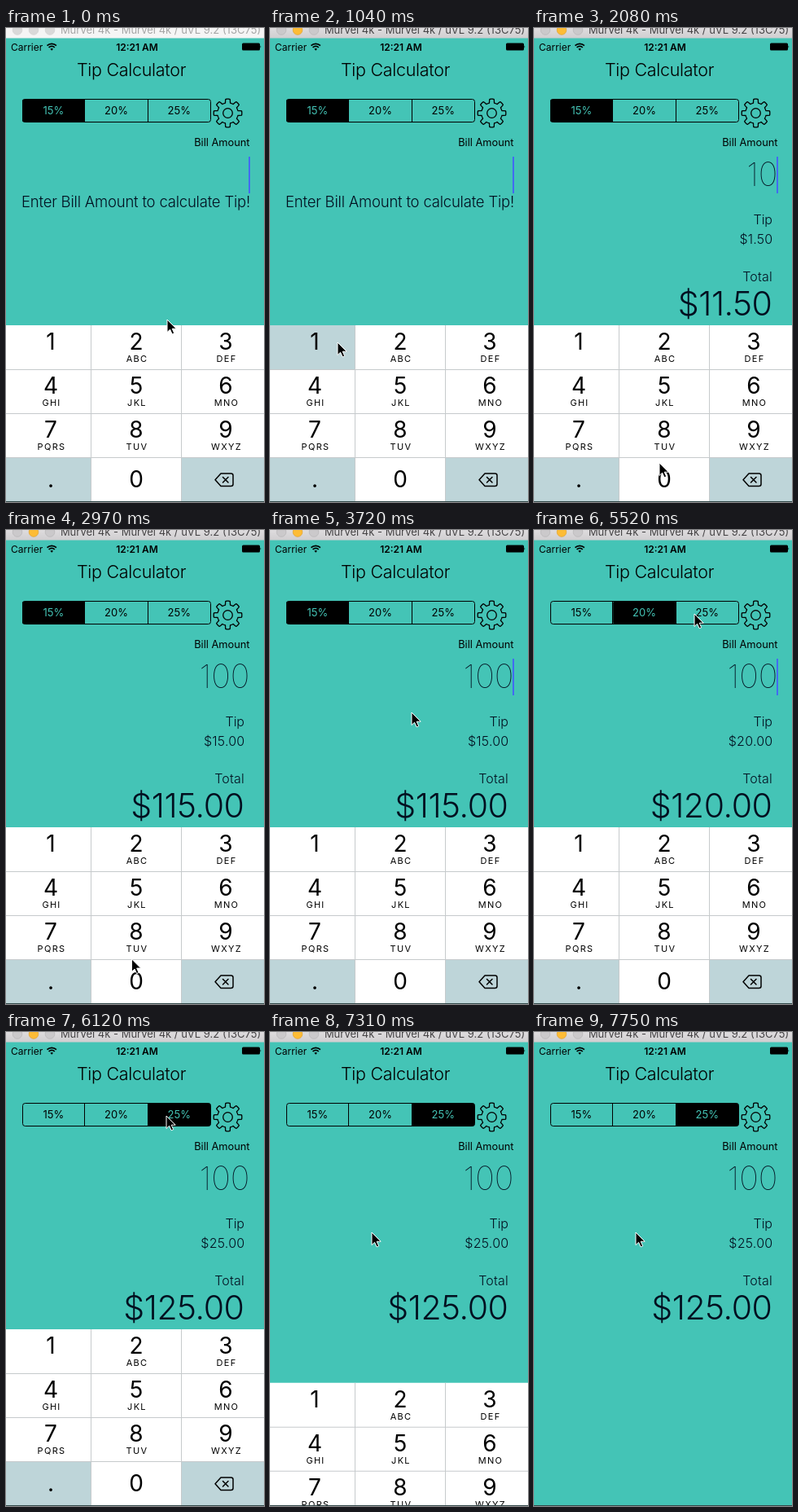
Animation, 317 px wide and 582 px high, one loop 8000 ms. Source, as an HTML page:

```html
<!DOCTYPE html>
<html lang="en">
<head>
<meta charset="utf-8">
<title>Tip Calculator</title>
<style>
  html, body { margin: 0; width: 100%; height: 100%; overflow: hidden; background: #44c4b6; }
  svg { display: block; width: 100%; height: 100%; }
  text { font-family: Inter, "Open Sans", sans-serif; font-size: 13px; font-optical-sizing: none; }
  .mid { text-anchor: middle; }
  .end { text-anchor: end; }
  .light { font-weight: 300; fill: #021020; font-size: 16px; }
  .line { fill: none; stroke: #000; }
  .letters { font-size: 11px; letter-spacing: 1.3px; }
  .digit { font-size: 28px; }
  .bar { fill: #f5f5f5; }
  .light-dot { fill: #d9d9d9; stroke: #cecece; stroke-width: .7; }
  .caption { fill: #a6a6a6; }
  .active .bar { fill: url(#barShade); }
  .active .light-dot { fill: #cbc9cb; stroke: #b5b3b5; }
  .active .amber { fill: #fdbc36; stroke: #e0a02c; }
  .active .caption { fill: #464446; }
</style>
</head>
<body>
<svg viewBox="0 0 317 582">
  <defs>
    <linearGradient id="barShade" x2="0" y2="1">
      <stop offset="0" stop-color="#dedcde"/><stop offset="1" stop-color="#d0ced0"/>
    </linearGradient>
  </defs>
  <rect width="317" height="582" fill="#44c4b6"/>

  <g id="window">
    <rect class="bar" width="317" height="12.5"/>
    <circle class="light-dot" cx="14" cy="2.5" r="5.8"/>
    <circle class="light-dot amber" cx="34" cy="2.5" r="5.8"/>
    <circle class="light-dot" cx="54" cy="2.5" r="5.8"/>
    <text class="caption mid" x="190" y="7">Murvel 4k - Murvel 4k / uVL 9.2 (13C75)</text>
  </g>

  <text x="6" y="27.5" style="font-size:12px">Carrier</text>
  <path class="line" stroke-width="1.7" d="M50.5 21.7a8 8 0 0 1 11.4 0M52.6 24a5 5 0 0 1 7.2 0"/>
  <path d="M56.2 27.800l-1.800-2q1.800-1.400 3.600 0z"/>
  <text class="mid" x="161" y="27.5" style="font-size:12px;font-weight:600">12:21 AM</text>
  <rect x="290" y="18.5" width="22" height="9" rx="1.5"/>
  <path d="M312.500 21.200q1.600 1.800 0 3.600z"/>

  <text class="mid" x="154" y="59" style="font-size:21.5px;font-weight:300;letter-spacing:-.3px">Tip Calculator</text>
  <g id="segments"></g>
  <rect class="line" x="20.5" y="87.5" width="231" height="28" rx="3"/>
  <path class="line" d="M96.500 88v27M174.500 88v27"/>
  <path id="gear" class="line" stroke-width="1.3"/>
  <circle class="line" cx="272.5" cy="104.5" r="5.8" stroke-width="1.3"/>

  <text class="end" x="299.5" y="145" style="font-size:12.8px">Bill Amount</text>
  <text id="bill" class="end" x="299.5" y="194" style="font-size:40px;font-weight:100;fill:#021020"></text>
  <rect id="caret" x="298" y="158" width="2" height="45" fill="#426bf2"/>
  <text id="prompt" class="light mid" x="159.5" y="220" style="font-size:18.5px;letter-spacing:-.2px">Enter Bill Amount to calculate Tip!</text>
  <g id="results" class="end">
    <text class="light" x="293" y="241">Tip</text>
    <text id="tip" class="light" x="293.5" y="265" style="letter-spacing:.25px"></text>
    <text class="light" x="293" y="311" style="letter-spacing:.2px">Total</text>
    <text id="total" class="light" x="292.5" y="353" style="font-size:41px;letter-spacing:-.4px"></text>
  </g>

  <g id="keypad">
    <rect y="365" width="317" height="217" fill="#fff"/>
    <path d="M0 527.500h104.500V582H0zM215.500 527.500H317V582H215.500z" fill="#bed5d9"/>
    <rect id="pressed" height="54" fill="#bed5d9"/>
    <path class="line" style="stroke:#c6cacc" d="M0 419.500H317M0 473.500H317M0 527.500H317M104.500 365V582M215.500 365V582"/>
    <g id="keys"></g>
    <path class="line" stroke-width="1.5" stroke-linejoin="round" stroke-linecap="round"
      d="M264 547H276.500q2.500 0 2.500 2.500V560q0 2.500-2.500 2.500H264L257 554.800zM266.500 551.500l6.500 6.500M273 551.500l-6.500 6.500"/>
  </g>
  <rect y="581" width="317" height="1" fill="#33494a"/>

  <path id="cursor" d="M0 0V15.500L3.600 12.200L6.100 17.800L8.700 16.700L6.200 11.200H11.200z"
    stroke="#fff" stroke-linejoin="round"/>
</svg>
<script>
const LOOP = 8000, TICK = 149, BLINK = 1000, DISMISS = 7250;
const $ = id => document.getElementById(id);
const svg = (parent, tag, attrs, text = '') => {
  const node = document.createElementNS('http://www.w3.org/2000/svg', tag);
  for (const name in attrs) node.setAttribute(name, attrs[name]);
  node.textContent = text;
  return parent.appendChild(node);
};

// Times in ms.
const taps = [{ at: 1190, digit: 1 }, { at: 1930, digit: 0 }, { at: 2380, digit: 0 }];
const rateChanges = [4170, 5600];
const home = { x: 198, y: 358 };
const moves = [
  { from: 150, to: 750, x: 83, y: 386 },
  { from: 1043, to: 1640, x: 154, y: 534 },
  { from: 2900, to: 3725, x: 174, y: 224 },
  { from: 3725, to: 4020, x: 150, y: 104 },
  { from: 4920, to: 5450, x: 197, y: 103 },
  { from: 6110, to: 6700, x: 120, y: 438 },
  { from: 6700, to: 7010, x: 125, y: 246 }
];

const segments = [15, 20, 25].map((rate, i) => {
  const x = 20 + 77.2 * i;
  return {
    rate,
    box: svg($('segments'), 'rect', { x, y: 87.5, width: 77, height: 28, rx: 2 }),
    label: svg($('segments'), 'text', { class: 'mid', x: x + 38.3, y: 106 }, rate + '%')
  };
});

const edges = [0, 104.5, 215.5, 317], centers = [55, 160, 270];
const letters = ['', 'ABC', 'DEF', 'GHI', 'JKL', 'MNO', 'PQRS', 'TUV', 'WXYZ'];
[...'123456789.0'].forEach((key, i) => {
  const x = centers[i % 3], y = 395 + 54 * Math.floor(i / 3) + (i > 8 ? 6.5 : 0);
  svg($('keys'), 'text', { class: 'mid digit', x, y }, key);
  svg($('keys'), 'text', { class: 'mid letters', x: x + 1, y: y + 15 }, letters[i]);
});

const gearPoints = Array.from({ length: 160 }, (_, i) => {
  const angle = i * Math.PI / 80;
  const tooth = Math.max(-1, Math.min(1, 3 * Math.cos(8 * angle)));
  const radius = 15 + 2.3 * tooth;
  return [272.5 + radius * Math.sin(angle), 104.5 - radius * Math.cos(angle)].map(v => v.toFixed(2));
});
$('gear').setAttribute('d', 'M' + gearPoints.join('L') + 'Z');

const clamp = value => Math.max(0, Math.min(1, value));
const ease = p => (1 - Math.cos(Math.PI * p)) / 2;
const show = (id, visible) => $(id).setAttribute('visibility', visible ? 'visible' : 'hidden');
const place = (id, x, y) => $(id).setAttribute('transform', `translate(${x} ${y})`);
const money = value => '$' + value.toFixed(2);

function cursorAt(t) {
  let { x, y } = home;
  for (const move of moves) {
    const part = ease(clamp((t - move.from) / (move.to - move.from)));
    x += (move.x - x) * part;
    y += (move.y - y) * part;
  }
  return [x, y];
}

function drawPressed(t) {
  const tap = taps.find(({ at }) => t >= at - 150 && t < at);
  show('pressed', tap);
  if (!tap) return;
  const index = (tap.digit + 10) % 11, column = index % 3;
  place('pressed', edges[column], 365 + 54 * Math.floor(index / 3));
  $('pressed').setAttribute('width', edges[column + 1] - edges[column]);
}

function draw(t) {
  $('window').classList.toggle('active', t >= 890);

  const typed = taps.filter(tap => tap.at <= t);
  const bill = typed.map(tap => tap.digit).join('');
  const chosen = rateChanges.filter(at => at <= t).length;
  const tip = bill * segments[chosen].rate / 100;
  $('bill').textContent = bill;
  $('tip').textContent = money(tip);
  $('total').textContent = money(+bill + tip);
  show('prompt', !bill);
  show('results', bill);
  segments.forEach(({ box, label }, i) => {
    box.setAttribute('fill', i === chosen ? '#000' : 'none');
    label.setAttribute('fill', i === chosen ? '#44c4b6' : '#000');
  });

  const lastKey = typed.length ? typed[typed.length - 1].at : 0;
  show('caret', t < DISMISS && (t - lastKey) % BLINK < BLINK / 2);
  drawPressed(t);
  place('keypad', 0, 217 * (1 - (1 - clamp((t - DISMISS) / 450)) ** 3));
  place('cursor', ...cursorAt(t));
}

function frame() {
  // The screen refreshes in steps, as a recording does.
  draw(Math.floor((performance.now() % LOOP + 10) / TICK) * TICK);
  requestAnimationFrame(frame);
}
frame();
</script>
</body>
</html>
```
